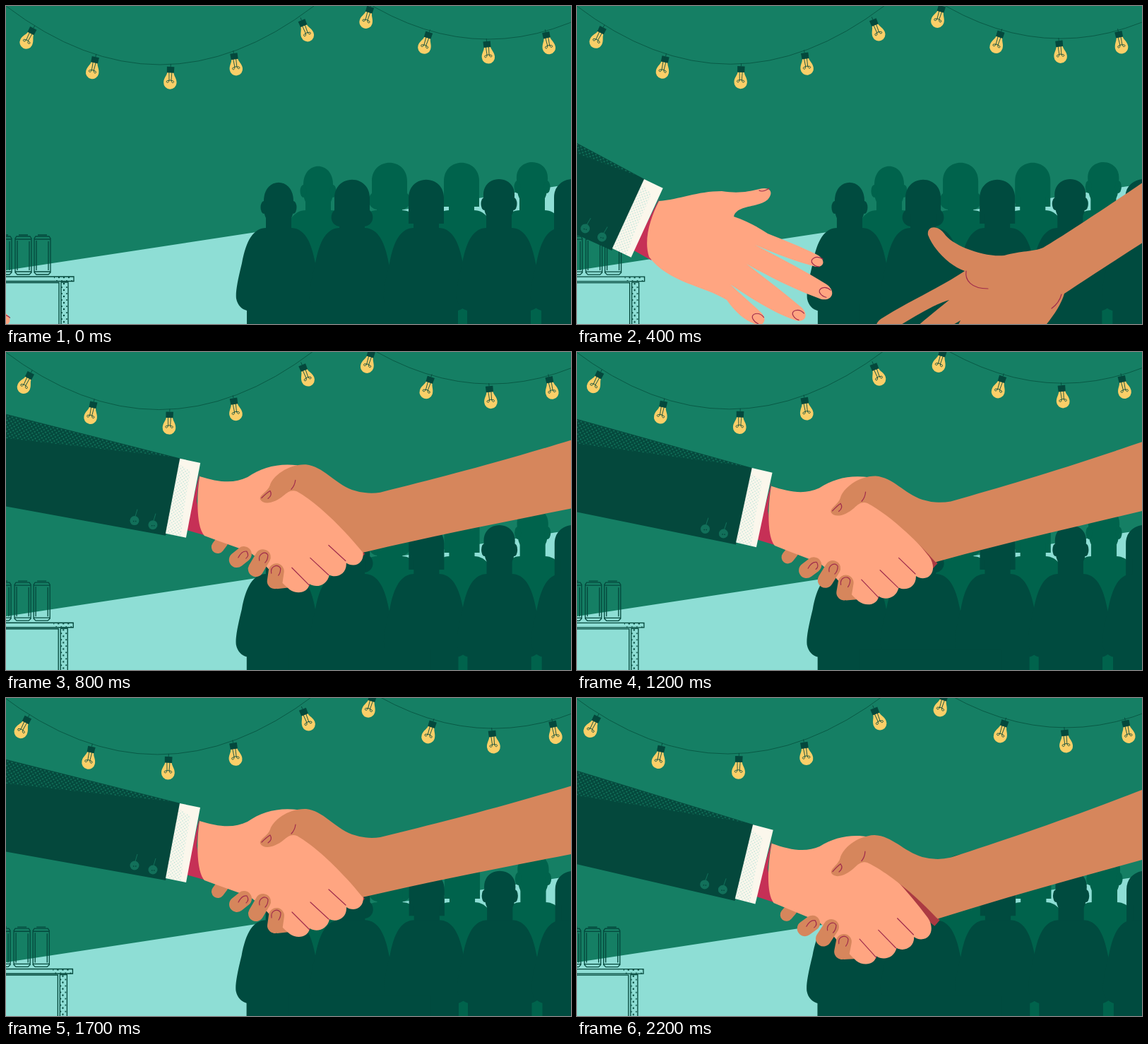
Recreate the animation shown at these times as an HTML page. Size 800 px wide and 450 px high, loop 2300 ms.

```html
<!DOCTYPE html>
<html lang="en">
<head>
<meta charset="utf-8">
<title>Handshake</title>
<style>
html, body { margin: 0; width: 100%; height: 100%; overflow: hidden; background: #157f64; }
svg { display: block; width: 100vw; height: 100vh; }
.peach { fill: #ffa581; }
.brown { fill: #d6865c; }
.dark { fill: #04483c; }
.crease { fill: none; stroke: #a02c4c; stroke-width: 1.2; stroke-linecap: round; }
.tips { fill: none; stroke: #d6865c; stroke-linecap: round; }
.ink { fill: none; stroke: #04483c; stroke-width: 1.3; }
</style>
</head>
<body>
<svg viewBox="0 0 800 450">
  <defs>
    <pattern id="sleeveDots" width="6" height="6" patternUnits="userSpaceOnUse" patternTransform="rotate(14)">
      <g fill="#157f64"><circle cx="1.5" cy="1.5" r="1.05"/><circle cx="4.5" cy="4.5" r="1.05"/></g>
    </pattern>
    <pattern id="cuffDots" width="5" height="5" patternUnits="userSpaceOnUse" patternTransform="rotate(11)">
      <g fill="#98d8cd"><circle cx="1.2" cy="1.2" r=".7"/><circle cx="3.7" cy="3.7" r=".7"/></g>
    </pattern>
    <pattern id="legDots" width="7" height="9" patternUnits="userSpaceOnUse">
      <g class="dark"><circle cx="2" cy="2" r="1"/><circle cx="5" cy="6" r="1.2"/></g>
    </pattern>
  </defs>

  <path fill="#8eded5" d="M0 374L800 252V450H0Z"/>
  <g id="scene">
    <g id="table" class="ink">
      <path d="M-20 383H96V389.500H-20M-20 391.500H75V460"/>
      <path fill="url(#legDots)" d="M78 391H88V460H78Z"/>
      <path fill="url(#legDots)" stroke="none" d="M68 383H95V390H68Z"/>
    </g>
    <g id="crowd"></g>
  </g>
  <g id="lights">
    <path fill="none" stroke="#07523f" stroke-width=".8" d="M0 0Q218 166 436 0M500 -11.600Q683 105.600 866 -11.600"/>
  </g>

  <g id="openRight">
    <path id="rightPalm" class="brown"/>
    <path id="rightCrease" class="crease"/>
  </g>

  <path id="gap" fill="#ab3a42" d="M430 205Q470 238 508 284L500 292L420 215Z"/>

  <g id="left">
    <g id="sleeve">
      <path fill="#c63056" d="M28 20L24 60L30 92L38 109L9 101Z"/>
      <path class="dark" d="M1 0L-400 -101V41L-20 109Z"/>
      <path fill="url(#sleeveDots)" d="M-8 -2L-400 -101V-46L-246 -28Z"/>
      <path fill="#fbf7ec" d="M0 0L29 6L9 112L-20 106Z"/>
      <path fill="url(#cuffDots)" d="M-1 8L15 18L6 70L2 110L-20 106Z"/>
      <g id="buttons"></g>
    </g>
    <g id="openLeft">
      <path id="leftPalm" class="peach"/>
      <g id="nails" class="crease"></g>
    </g>
    <g id="claspLeft">
      <path class="tips" stroke-width="18" d="M300 274L306 266"/>
      <path class="brown" d="M370 300L402 331L384 333Z"/>
      <path class="peach" d="M274 174C300 182 322 185 342 175C362 161 385 155 412 158L425 190Q470 232 500 268C510 281 507 298 492 299Q486 299 482 296C483 312 468 318 458 313C455 328 440 332 430 326C428 339 412 341 402 334C385 320 368 298 345 281L300 265L281 258C269 245 270 200 274 174Z"/>
      <path class="tips" stroke-width="22" d="M327 292L337 284M354 305L364 288M381 322L383 308"/>
      <path class="crease" d="M457 271L481 293M431 289L457 313M405 303L430 328M329 289Q334 279 341 280M341 280Q345 286 340 290M359 293C357 284 367 278 371 285Q371 292 367 296M376 311C374 300 386 297 389 304Q389 310 386 314"/>
    </g>
  </g>

  <g id="claspRight">
    <path class="brown" d="M360 206C358 200 371 195 374 186C378 173 400 156 425 157C450 160 464 183 490 193Q510 200 530 197C640 170 730 148 960 75V190C820 218 660 246 505 282C476 246 440 211 412 195C404 192 399 196 393 201C381 211 365 215 360 206Z"/>
    <path class="crease" d="M410 179Q409 187 404 192M362 204Q369 197 374 194Q378 200 371 205"/>
  </g>
</svg>
<script>
const LOOP = 2300, STEP = 100;
const $ = id => document.getElementById(id);
const add = (id, markup) => $(id).insertAdjacentHTML('beforeend', markup);
const move = (id, value) => $(id).setAttribute('transform', value);
const show = (id, on) => $(id).style.display = on ? '' : 'none';
const mix = (a, b, k) => a + (b - a) * k;

// Blend two paths of the same structure.
function mixPath([a, b], k) {
  const ends = b.match(/\d+/g);
  let i = 0;
  return a.replace(/\d+/g, n => mix(+n, +ends[i++], k).toFixed(1));
}

const ears = '<ellipse cx="-21" cy="35" rx="4.500" ry="9"/><ellipse cx="21" cy="35" rx="4.500" ry="9"/>';
const heads = {
  short: '<path d="M-21 26C-21 -9 21 -9 21 26V36C21 70 -21 70 -21 36Z"/>' + ears,
  cropped: '<path d="M-22 24C-24 -8 24 -8 22 24L21 38C21 70 -21 70 -21 38Z"/>' + ears,
  bob: '<path d="M-25 26C-25 -9 25 -9 25 26V43C33 50 30 66 16 66H-16C-30 66 -33 50 -25 43Z"/>',
  straight: '<path d="M-25 26C-25 -9 25 -9 25 26V62H-25Z"/>',
  long: '<path d="M-27 26C-27 -9 27 -9 27 26V90H-27Z"/>'
};
const body = 'M-17 0C-36 0 -46 18 -52 50C-59 78 -61 92 -60 100C-58 110 -52 115 -45 117V190H45V117C52 115 58 110 60 100C61 92 59 78 52 50C46 18 36 0 17 0Z';

function row(color, shoulder, people) {
  add('crowd', `<g fill="${color}">` + people.map(([x, top, kind]) =>
    `<g transform="translate(${x} ${top})">${heads[kind]}<path d="M-18 48H18V74H-18Z"/></g>
     <path d="${body}" transform="translate(${x} ${shoulder})"/>`).join('') + '</g>');
}
row('#00634c', 289, [[442, 227, 'short'], [543, 222, 'bob'], [645, 222, 'straight'], [745, 221, 'cropped']]);
row('#004b3f', 314, [[386, 250, 'short'], [490, 246, 'bob'], [595, 246, 'straight'], [698, 245, 'cropped'], [803, 245, 'long']]);
add('crowd', '<path fill="#004b3f" d="M400 420H600V460H400Z"/>');

for (const x of [-15, 13, 40])
  add('table', `<path d="M${x + 2} 326H${x + 21}L${x + 23} 329V377L${x + 20} 380H${x + 3}L${x} 377V329ZM${x + 5} 324H${x + 18}M${x} 330H${x + 23}M${x} 376H${x + 23}M${x + 3} 332V374M${x + 20} 333V374"/>`);

// Cap centre and tilt of each bulb.
const bulbs = [[37, 35, 27], [126, 76, 12], [233, 90, 2], [323, 71, -9], [420, 24, -22],
  [515, 5, 17], [598, 41, 18], [681, 54, -6], [765, 41, -12]];
for (const [x, y, tilt] of bulbs)
  add('lights', `<g transform="translate(${x} ${y}) rotate(${tilt})">
    <path fill="#fbcf68" d="M-4.500 4C-5 9 -9.200 12 -9.200 18.500A9.200 9.200 0 0 0 9.200 18.500C9.200 12 5 9 4.500 4Z"/>
    <path class="dark" d="M-5.200 -4H5.200L5 4.500H-5Z"/>
    <path class="ink" style="stroke-width:.8" d="M0 -8V-4M-2 4L-1.500 15C-2 21 -7 18 -4.500 16Q0 14 4.500 16C7 18 2 21 1.500 15L2 4"/></g>`);

for (const [x, y] of [[-64, 88], [-38, 94]])
  add('buttons', `<g transform="translate(${x} ${y})"><circle r="6.500" fill="#12705a"/>
    <path stroke="#12705a" d="M1 -6L4 -16"/><path stroke="#04483c" stroke-width="1.500" d="M-2 1H-.5M1 1H2.500"/></g>`);

// Each open hand: reaching, then meeting.
const leftPalm = [
  'M116 276C145 274 170 262 205 262C230 266 245 262 258 259C274 255 279 264 270 274C256 286 226 281 222 298C240 304 255 312 270 322C295 332 318 341 338 351C352 357 352 370 338 369C310 362 280 350 252 338C290 358 325 376 352 393C367 402 363 418 346 415C310 402 275 385 240 365C265 384 290 403 316 425C330 436 323 449 310 445C280 435 250 416 217 394C232 408 246 420 260 433C271 443 264 455 252 450C236 444 225 434 212 416C180 396 130 392 102 355C94 330 104 300 116 276Z',
  'M252 206C285 198 300 178 340 166C360 159 366 140 375 132C386 122 399 134 394 150C388 170 358 180 358 197C375 204 400 207 425 212C450 216 470 219 488 222C500 224 500 236 488 237C455 237 430 233 398 231C440 238 480 250 512 260C526 265 524 279 508 278C470 277 430 270 388 262C420 272 455 286 486 299C498 305 494 318 480 317C450 314 420 303 380 292C400 300 418 310 432 320C442 328 438 340 426 338C400 333 385 328 365 314C330 305 290 308 250 287C240 262 244 230 252 206Z'];
const rightPalm = [
  'M497 324C495 311 510 309 520 322C530 338 575 356 605 353C630 346 645 348 660 342C710 312 800 250 900 184L900 271C830 317 745 370 690 407C685 425 670 445 655 462C620 480 560 500 530 510C516 512 510 498 520 490C528 475 535 460 543 445C525 455 500 472 478 486C464 490 458 478 468 466C490 445 510 430 527 416C500 424 470 445 440 462C424 464 418 452 430 443C465 420 515 398 549 375C528 368 505 345 497 324Z',
  'M387 176C386 160 400 156 406 167C415 190 455 205 490 222C510 236 525 240 548 236C640 203 800 142 960 75L960 190C800 240 680 272 550 310C535 328 510 336 470 338C430 348 400 362 360 376C346 380 340 366 350 361C375 350 395 340 415 328C375 335 335 350 302 357C288 358 284 344 296 340C325 332 350 322 380 312C340 314 310 318 275 318C258 316 256 303 268 299C320 285 380 262 425 235C405 215 389 200 387 176Z'];
const rightCrease = [
  'M551 375C549 388 558 400 582 400M686 408Q683 420 672 428',
  'M427 235C425 250 435 263 455 268M543 309Q540 320 524 328'];

// Nails as x, y, angle while reaching, then while meeting.
const nails = [[340, 361, 25, 487, 230, 8], [351, 404, 32, 506, 268, 18],
  [313, 436, 38, 483, 308, 24], [256, 441, 42, 426, 328, 35]];
nails.forEach((_, i) => add('nails', `<path id="nail${i}" d="M6 -6C-5 -8 -12 3 -4 6Q1 8 6 6"/>`));
add('nails', '<path id="thumbNail" d="M-7 1Q-2 4 7 -2"/>');

// Time and depth of the shake.
const shakes = [[700, .4], [800, .06], [1200, .5], [1700, 0], [2200, 1]];
function depth(t) {
  const i = Math.max(1, shakes.findIndex(s => s[0] >= t));
  const [t0, a] = shakes[i - 1], [t1, b] = shakes[i];
  return mix(a, b, (1 - Math.cos(Math.PI * (t - t0) / (t1 - t0))) / 2);
}

function drawReach(t) {
  const k = Math.max(0, (t - 400) / 200), away = Math.max(0, 1 - t / 400);
  const shape = (id, pair) => $(id).setAttribute('d', mixPath(pair, k));
  shape('leftPalm', leftPalm);
  shape('rightPalm', rightPalm);
  shape('rightCrease', rightCrease);
  move('left', `translate(${-332 * away} ${49 * away}) rotate(${8 * away} 100 300)`);
  move('openRight', `translate(${208 * away} ${298 * away}) rotate(${-28 * away} 505 315)`);
  move('sleeve', `translate(${mix(95, 227, k)} ${mix(245, 180, k)}) rotate(${mix(14, 5, k)})`);
  nails.forEach((n, i) => move('nail' + i,
    `translate(${mix(n[0], n[3], k)} ${mix(n[1], n[4], k)}) rotate(${mix(n[2], n[5], k)})`));
  move('thumbNail', `translate(${mix(265, 380, k)} ${mix(260, 136, k)}) rotate(${mix(0, -42, k)})`);
}

function drawShake(t) {
  const p = depth(t), right = `rotate(${-4.4 * p} 905 225)`;
  move('left', `rotate(${2.9 * p} -350 225)`);
  move('sleeve', 'translate(246 149)');
  move('gap', right);
  move('claspRight', right);
}

const zoom = (x, y, s) => `translate(${x} ${y}) scale(${s}) translate(${-x} ${-y})`;

function frame(now) {
  const t = Math.floor(now % LOOP / STEP) * STEP, clasped = t >= 700;
  move('scene', zoom(430, 280, 1 + .006 * t / 2200));
  move('lights', zoom(360, 215, 1 + .03 * t / 2200));
  for (const id of ['openLeft', 'openRight']) show(id, !clasped);
  for (const id of ['claspLeft', 'claspRight', 'gap']) show(id, clasped);
  (clasped ? drawShake : drawReach)(t);
  requestAnimationFrame(frame);
}
frame(performance.now());
</script>
</body>
</html>
```
